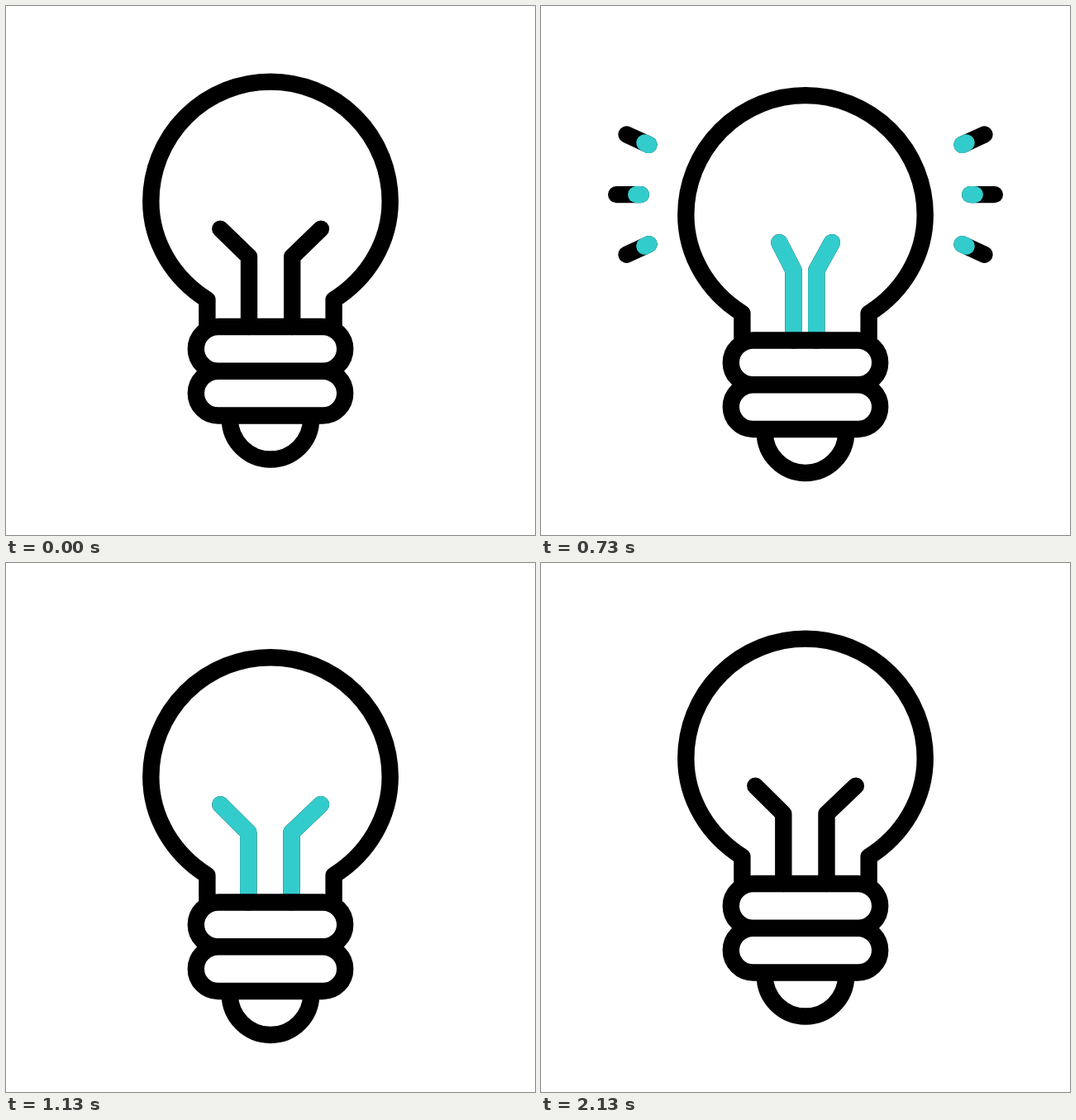
Animation, 640 px wide and 640 px high, one loop 2500 ms. Source, as an HTML page with a canvas:

```html
<!DOCTYPE html>
<html lang="en">
<head>
<meta charset="utf-8">
<title>Light bulb</title>
<style>
  html, body { margin: 0; width: 100%; height: 100%; overflow: hidden; background: #fff; }
  canvas { display: block; width: 100vmin; height: 100vmin; }
</style>
</head>
<body>
<canvas width="640" height="640"></canvas>
<script>
const ctx = document.querySelector('canvas').getContext('2d');
const BLACK = '#000', TEAL = '#33cccc';
const LOOP = 2500, FPS = 30;

const glass = new Path2D(
  'M243.4 388V355.3C202.3 329.5 175.3 285.5 175.3 236.3' +
  'A144.7 144.7 0 0 1 464.7 236.3C464.7 285.5 437.7 329.5 396.6 355.3V388');
const socket = new Path2D('M270.8 496V499.3A49.2 49.2 0 0 0 369.2 499.3V496');
for (const y of [388, 441.7]) socket.roundRect(229.8, y, 180.4, 53.8, 26.9);

// Left-hand rays, inner end first; the right-hand ones are mirrored.
const leftRays = [
  [[130.5, 151.4], [103.5, 139]],
  [[120.8, 211.6], [91.2, 211.6]],
  [[130.5, 271.8], [103.5, 284.2]]
];
const rays = leftRays.concat(leftRays.map(ray => ray.map(([x, y]) => [640 - x, y])));

// Eased progress from 0 to 1 between two moments, counted in 1/30 s.
function ease(t, start, end) {
  const p = Math.min(1, Math.max(0, (t - start) / (end - start)));
  return (1 - Math.cos(Math.PI * p)) / 2;
}

const pulse = (t, start, peak, end) => ease(t, start, peak) - ease(t, peak, end);

// Strokes the part of a polyline between two fractions of its length.
function strokePart(points, color, from, to) {
  if (to - from < 0.001) return;
  let length = 0;
  ctx.beginPath();
  points.forEach(([x, y], i) => {
    ctx.lineTo(x, y);
    if (i) length += Math.hypot(x - points[i - 1][0], y - points[i - 1][1]);
  });
  ctx.strokeStyle = color;
  ctx.setLineDash(from > 0 || to < 1 ? [(to - from) * length, 9999] : []);
  ctx.lineDashOffset = -from * length;
  ctx.stroke();
  ctx.setLineDash([]);
}

function drawFilaments(t) {
  const squeeze = pulse(t, 9, 20, 26.5);
  const nudge = t < 10 ? 0 : 0.7;
  const knee = 15.6 * squeeze, tip = 37 * squeeze;
  const wires = [
    [294 - nudge + knee, 259.3 + tip],
    [346.2 - nudge - knee, 380.9 - tip]
  ];
  for (const [x, tipX] of wires) {
    const wire = [[x, 388], [x, 303.4], [tipX, 269.7]];
    strokePart(wire, BLACK, 0, 1);
    strokePart(wire, TEAL, ease(t, 52, 64), ease(t, 12, 19));
  }
}

function drawRays(t) {
  for (const ray of rays) {
    if (t < 26) strokePart(ray, BLACK, 0, ease(t, 14, 21));
    strokePart(ray, TEAL, ease(t, 24, 31), ease(t, 20, 27));
  }
}

function draw(now) {
  const t = Math.floor((now % LOOP) * FPS / 1000 + 0.2);
  const dip = 23 * (pulse(t, 12.5, 19.5, 26.5) + pulse(t, 26.5, 33.5, 39));

  ctx.fillStyle = '#fff';
  ctx.fillRect(0, 0, 640, 640);
  ctx.save();
  ctx.translate(0, dip);
  ctx.lineWidth = 20.4;
  ctx.lineCap = ctx.lineJoin = 'round';
  drawRays(t);
  drawFilaments(t);
  ctx.strokeStyle = BLACK;
  ctx.stroke(glass);
  ctx.stroke(socket);
  ctx.restore();
}

const startTime = performance.now();
function tick() {
  draw(performance.now() - startTime);
  requestAnimationFrame(tick);
}
tick();
</script>
</body>
</html>
```
